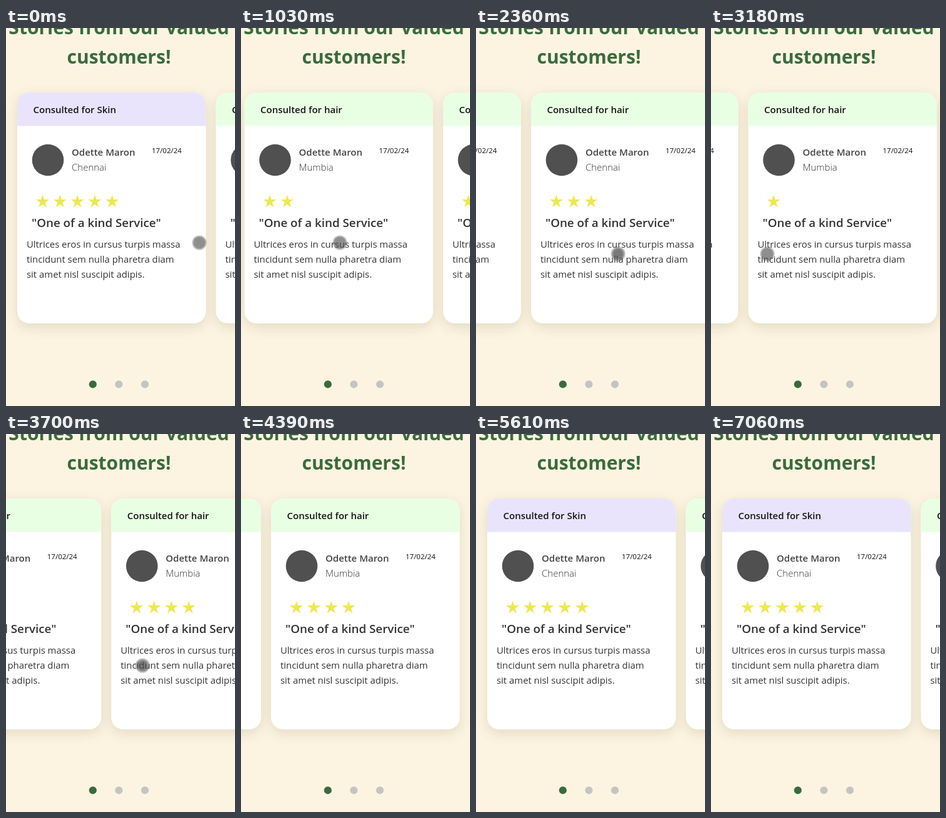
Write an HTML page with a canvas that moves like this. It is 366 by 604 pixels and loops after 7.7 s.

```html
<!DOCTYPE html>
<html lang="en">
<head>
<meta charset="utf-8">
<title>Testimonials</title>
<style>
html, body { margin: 0; width: 100%; height: 100%; overflow: hidden; background: #fcf4e1; }
canvas { display: block; }
</style>
</head>
<body>
<canvas id="stage" width="366" height="604"></canvas>
<script>
const ctx = document.getElementById('stage').getContext('2d');
const LOOP = 7700, PITCH = 317.5, CARD_W = 301.5;
const FLING = 600, GLIDE = 290, REACH = 151;
const FONT = '"Open Sans", "Noto Sans", sans-serif';

const cards = [
  { topic: 'Skin', city: 'Chennai', stars: 5 },
  { topic: 'hair', city: 'Mumbia', stars: 2 },
  { topic: 'hair', city: 'Chennai', stars: 3 },
  { topic: 'hair', city: 'Mumbia', stars: 1 },
  { topic: 'hair', city: 'Mumbia', stars: 4 }
];
const review = ['Ultrices eros in cursus turpis massa',
  'tincidunt sem nulla pharetra diam', 'sit amet nisl suscipit adipis.'];

// Each swipe starts with the pointer at x, y and scrolls the row to `to`
const swipes = [
  { at: 20, to: 330, x: 309, y: 343 },
  { at: 1548, to: 530, x: 241, y: 362 },
  { at: 2342, to: 911, x: 241, y: 361 },
  { at: 3530, to: 1240, x: 314, y: 370 }
];
// The pointer has left the stage when the row rewinds
const rewind = { at: 4420, to: 0, x: 395, y: 350, span: 1085 };
const moves = [...swipes, rewind];

const clamp = u => Math.max(0, Math.min(1, u));
const easeOut = u => 1 - (1 - u) ** 3;
const smooth = u => u * u * (3 - 2 * u);
const mix = (a, b, u) => a + (b - a) * u;
const progress = ({ at, span = FLING }, t) => clamp((t - at) / span);

function scrollAt(t) {
  return moves.reduce((pos, move) => mix(pos, move.to, easeOut(progress(move, t))), 0);
}

function text(str, x, y, size, weight, color) {
  ctx.font = `${weight} ${size}px ${FONT}`;
  ctx.fillStyle = color;
  ctx.fillText(str, x, y);
}

function circle(x, y, r, color) {
  ctx.fillStyle = color;
  ctx.beginPath();
  ctx.arc(x, y, r, 0, 2 * Math.PI);
  ctx.fill();
}

function star(x, y) {
  ctx.fillStyle = '#ede757';
  ctx.beginPath();
  for (let i = 0; i < 10; i++) {
    const r = i % 2 ? 4.2 : 11, a = i * Math.PI / 5;
    ctx.lineTo(x + r * Math.sin(a), y - r * Math.cos(a));
  }
  ctx.fill();
}

function drawCard({ topic, city, stars }, x) {
  ctx.save();
  ctx.beginPath();
  ctx.roundRect(x, 103, CARD_W, 369, 19);
  ctx.shadowColor = 'rgba(80, 65, 30, 0.14)';
  ctx.shadowBlur = 20;
  ctx.shadowOffsetY = 6;
  ctx.fillStyle = '#fff';
  ctx.fill();
  ctx.restore();

  ctx.fillStyle = topic === 'Skin' ? '#e9e4fc' : '#e9ffe4';
  ctx.beginPath();
  ctx.roundRect(x, 103, CARD_W, 53.5, [19, 19, 0, 0]);
  ctx.fill();
  text('Consulted for ' + topic, x + 25.5, 136, 15, 600, '#151515');

  circle(x + 49, 211, 25.3, '#505050');
  text('Odette Maron', x + 87, 204, 15, 600, '#444');
  text(city, x + 87, 228, 15, 300, '#333');
  text('17/02/24', x + 215, 200, 11.5, 400, '#111');
  for (let i = 0; i < stars; i++) star(x + 40.5 + i * 27.8, 277.5);
  text('"One of a kind Service"', x + 23, 318, 18.8, 600, '#333');
  review.forEach((line, i) => text(line, x + 15, 351 + i * 24, 14.9, 400, '#333'));
}

function drawPointer(t) {
  if (t >= rewind.at) return;
  const i = Math.max(0, swipes.findLastIndex(s => s.at <= t));
  const swipe = swipes[i], next = moves[i + 1];
  const drag = progress(swipe, t);
  const back = smooth(clamp(1 - (next.at - t) / GLIDE));
  const x = mix(swipe.x - REACH * easeOut(drag), next.x, back);
  const y = mix(swipe.y, next.y, back);
  circle(x, y, 11.5, 'rgba(80, 80, 80, 0.38)');
  circle(x, y, 9.5, 'rgba(80, 80, 80, 0.42)');
  if (drag > 0 && drag < 0.6) circle(x, y, 7.5, 'rgba(60, 60, 60, 0.25)');
}

function draw(now) {
  const t = now % LOOP;
  ctx.fillStyle = '#fcf4e1';
  ctx.fillRect(0, 0, 366, 604);

  ctx.textAlign = 'center';
  text('Stories from our valued', 180.5, 10, 30, 700, '#3b6b3d');
  text('customers!', 180.5, 57, 30, 700, '#3b6b3d');
  ctx.textAlign = 'left';

  const scroll = scrollAt(t);
  cards.forEach((card, i) => drawCard(card, 18 + i * PITCH - scroll));
  for (let i = 0; i < 3; i++) circle(138.8 + i * 41.6, 569.3, 6.1, i ? '#c4c4c4' : '#3b6b3d');
  drawPointer(t);
  requestAnimationFrame(draw);
}
requestAnimationFrame(draw);
</script>
</body>
</html>
```
